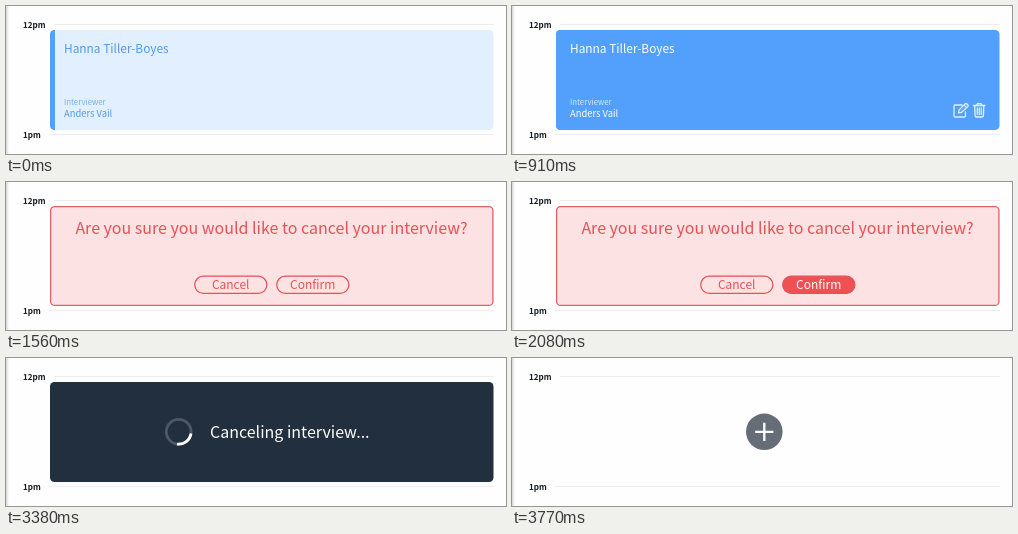
An HTML page for the animation above (5.07 s loop, 500x148 px).

```html
<!DOCTYPE html>
<html lang="en">
<head>
<meta charset="utf-8">
<style>
  html, body { margin: 0; width: 100%; height: 100%; overflow: hidden; background: #fefefe; }
  svg { display: block; width: 500px; height: 148px; font-family: "Noto Sans CJK JP", "Noto Sans CJK SC", "Noto Sans CJK", "Noto Sans", sans-serif; }
  .hour { font-size: 8.1px; font-weight: 700; fill: #161a20; }
  .rule { stroke: #ececee; }
  .name { font-size: 11.9px; }
  .label { font-size: 7.8px; font-weight: 300; opacity: .75; }
  .person { font-size: 9.4px; }
  .button { font-size: 12px; text-anchor: middle; }
  .icon { fill: none; stroke: #fff; stroke-width: 1.3; stroke-linejoin: round; stroke-linecap: round; }
</style>
</head>
<body>
<svg viewBox="0 0 500 148">
  <defs>
    <linearGradient id="edge">
      <stop stop-color="#d4d5d7"/>
      <stop offset="1" stop-color="#fefefe"/>
    </linearGradient>
    <clipPath id="cardShape"><rect x="44" y="24" width="443.5" height="100" rx="4.5"/></clipPath>
  </defs>
  <rect width="3" height="148" fill="url(#edge)"/>
  <text class="hour" x="17" y="22">12pm</text>
  <text class="hour" x="17" y="132">1pm</text>
  <path class="rule" d="M48 18.5H488M43 128.5H488"/>

  <g id="booking">
    <g clip-path="url(#cardShape)">
      <rect id="cardFill" x="44" y="24" width="444" height="100"/>
      <rect x="44" y="24" width="5" height="100" fill="#529ffc"/>
    </g>
    <g id="details">
      <text class="name" x="58" y="47">Hanna Tiller-Boyes</text>
      <text class="label" x="58" y="99">Interviewer</text>
      <text class="person" x="58" y="111">Anders Vail</text>
    </g>
    <g id="actions" class="icon">
      <g id="edit">
        <path d="M450 99H443.2Q442 99 442 100.2V109.8Q442 111 443.2 111H452.3Q453.5 111 453.5 109.8V106"/>
        <path d="M446.5 106.8L447 104.1L453.3 97.8Q454 97.1 454.7 97.8L455.9 99Q456.6 99.7 455.9 100.4L449.3 106.5ZM452 99.1L454.5 101.6"/>
      </g>
      <path id="trash" d="M461.5 99.5H473M464.5 99.3L465.4 97.6H469.1L470 99.3M462.7 99.7L463.1 109.6Q463.2 111 464.5 111H470Q471.3 111 471.4 109.6L471.8 99.7M465.3 102V108.5M467.3 102V108.5M469.3 102V108.5"/>
    </g>
  </g>

  <g id="question" fill="#e25256">
    <rect x="44.6" y="24.6" width="442.3" height="98.8" rx="4" fill="#fde2e3" stroke="#dc6267" stroke-width="1.3"/>
    <text x="265.5" y="52" font-size="16" font-weight="500" text-anchor="middle">Are you sure you would like to cancel your interview?</text>
    <g stroke="#e25256" stroke-width="1.3">
      <rect x="188.7" y="94.2" width="72.2" height="17.2" rx="8.6" fill="none"/>
      <rect id="confirmPill" x="270.7" y="94.2" width="72.2" height="17.2" rx="8.6"/>
    </g>
    <text class="button" x="224.7" y="107">Cancel</text>
    <text class="button" id="confirmText" x="306.7" y="107">Confirm</text>
  </g>

  <g id="status">
    <rect x="44" y="24" width="443.5" height="100" rx="4.5" fill="#222f3e"/>
    <g fill="none" stroke="#fff" stroke-width="2.8" transform="translate(172.7 73.8)">
      <circle r="12.4" stroke-opacity=".2"/>
      <path id="spinner" d="M-8.77 8.77A12.4 12.4 0 0 1 -8.77 -8.77"/>
    </g>
    <text x="204" y="80" font-size="16" font-weight="500" fill="#fff">Canceling interview...</text>
  </g>

  <g id="add">
    <circle cx="252.3" cy="73.8" r="18.3" fill="#666d77"/>
    <path d="M243.2 73.8H261.4M252.3 64.7V82.9" stroke="#fff" stroke-width="2.3"/>
  </g>
</svg>
<script>
const LOOP = 5070, STEP = 130, SPIN = 1100;
const $ = id => document.getElementById(id);
const show = (id, visible) => $(id).style.display = visible ? "" : "none";
const mix = (a, b, p) => a + (b - a) * p;

function draw(now) {
  const t = Math.floor(now % LOOP / STEP) * STEP;
  const hovered = t >= 260, confirming = t >= 2080;

  show("booking", t < 1560);
  show("question", t >= 1560 && t < 2730);
  show("status", t >= 2730 && t < 3770);
  show("add", t >= 3770);

  $("cardFill").style.fill = hovered ? "#529ffc" : "#e1effe";
  $("details").style.fill = hovered ? "#fff" : "#519be8";
  show("actions", hovered);
  const focus = Math.min(1, Math.max(0, (t - 780) / 650));
  $("edit").style.opacity = mix(.85, .75, focus);
  $("trash").style.opacity = mix(.8, 1, focus);

  $("confirmPill").style.fill = confirming ? "#ef5054" : "none";
  $("confirmText").style.fill = confirming ? "#fff" : "#e25256";

  $("spinner").setAttribute("transform", `rotate(${20 + (t - 2730) / SPIN * 360})`);
}

const start = performance.now();
function tick() {
  draw(performance.now() - start);
  requestAnimationFrame(tick);
}
tick();
</script>
</body>
</html>
```
